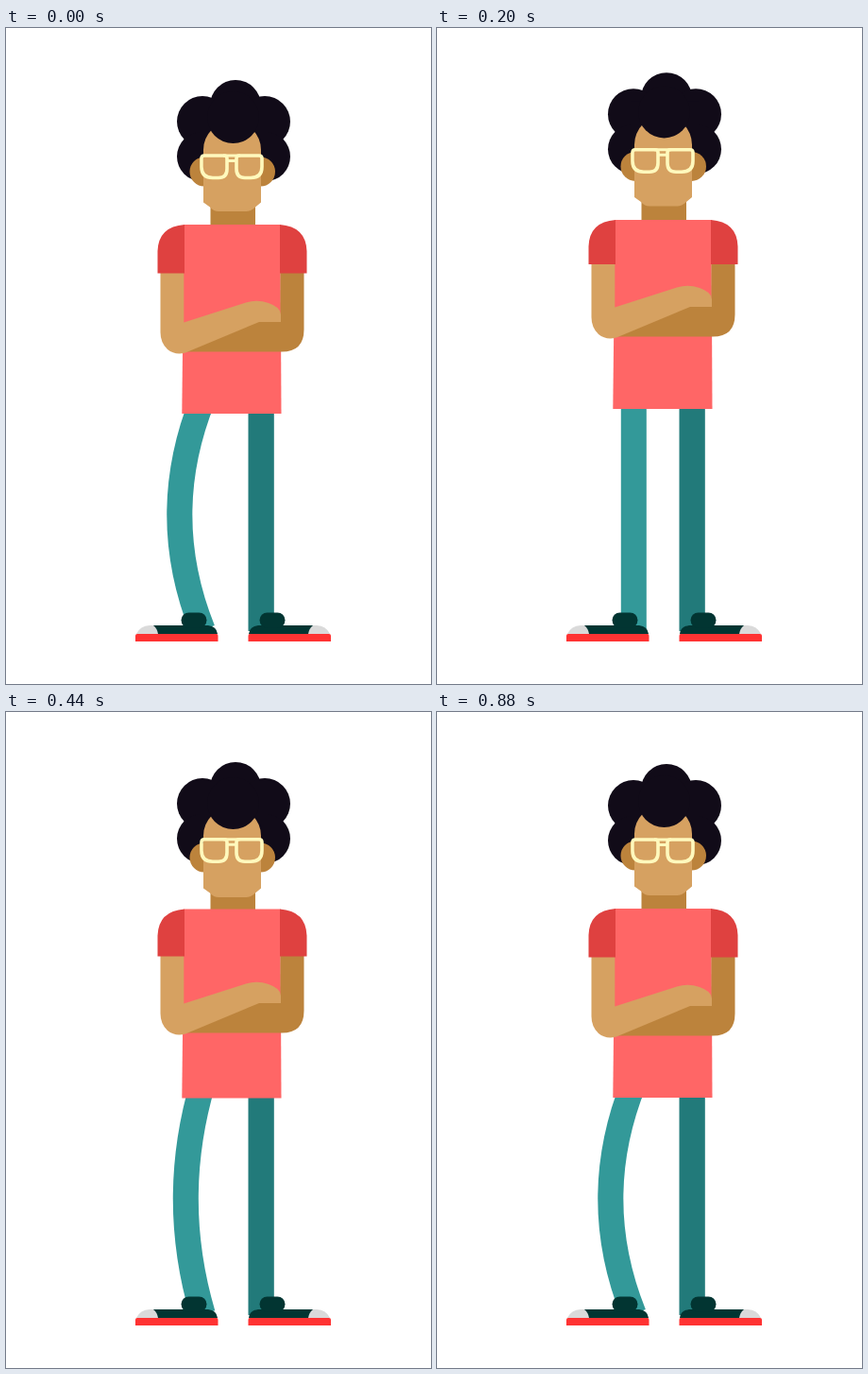
Animation, 450 px wide and 694 px high, one loop 3.84 s. Source, as an HTML page:

```html
<!DOCTYPE html>
<html lang="en">
<head>
<meta charset="utf-8">
<title>Standing figure</title>
<style>
  html, body { margin: 0; width: 100%; height: 100%; overflow: hidden; background: #fff; }
  svg { display: block; width: 100%; height: 100%; }
  .hair { fill: #110b18; }
  .skin { fill: #d6a161; }
  .shade { fill: #bc833c; }
  .shirt { fill: #f66; }
  .sleeve { fill: #df4140; }
  .shoe { fill: #023532; }
  .toe { fill: #dadada; }
  .sole { fill: #f33; }
  .glasses { fill: none; stroke: #fff9bd; stroke-width: 3.6; }
</style>
</head>
<body>
<svg viewBox="0 0 450 694">
  <defs>
    <g id="foot">
      <path class="shoe" d="M155 632H214Q223 633 224 641H155Z"/>
      <rect class="shoe" x="185.500" y="618.500" width="27" height="16" rx="8"/>
      <path class="toe" d="M138 641Q142 632.500 152 632H156Q160 635 161 641Z"/>
      <path class="sole" d="M137 649V643Q137 641 139 641H223Q224.500 641 224.500 643V649Z"/>
    </g>
  </defs>

  <path id="leg" fill="none" stroke="#399" stroke-width="27"/>
  <rect x="256.500" y="395" width="27.300" height="243" fill="#227a7a"/>
  <use href="#foot"/>
  <use href="#foot" transform="translate(481 0) scale(-1 1)"/>

  <g id="hair" class="hair">
    <circle cx="243" cy="82" r="27"/>
    <circle cx="208" cy="99" r="27"/>
    <circle cx="274" cy="99" r="27"/>
    <circle cx="207" cy="136" r="26"/>
    <circle cx="275" cy="136" r="26"/>
    <rect x="205" y="85" width="72" height="50"/>
  </g>

  <g id="face">
    <rect class="shade" x="216.500" y="170" width="47.500" height="50"/>
    <circle class="shade" cx="210" cy="152" r="15.500"/>
    <circle class="shade" cx="269.500" cy="152" r="15.500"/>
    <path class="skin" d="M209 129A30.500 30.500 0 0 1 270 129V184.500L264 189.500Q259 194 254 194H225Q220 194 216 189.500L209 184.500Z"/>
    <circle class="hair" cx="240.500" cy="94.500" r="27.500"/>
  </g>

  <g id="glasses" class="glasses">
    <path id="lens" d="M207 138Q207 135 210 135H231Q234 135 234 138V149Q234 158.500 225 158.500H219Q207 158.500 207 147Z"/>
    <use href="#lens" transform="translate(478 0) scale(-1 1)"/>
    <path d="M230 135H248M234 140.500H244" stroke-width="3"/>
  </g>

  <path id="torso" class="shirt" d="M188.500 208H290.500L291.500 408H186.300Z"/>

  <g id="arms">
    <path class="shade" d="M290.500 250H315.500V319Q315.500 342.500 292 342.500H187L268 309H290.500Z"/>
    <path class="skin" d="M163.500 250H188.300V311.500L254 290.500Q266 287 278 291Q291 295.500 291 303V311H268L190 343.500Q179 346.500 171 340Q163.500 333 163.500 322Z"/>
  </g>
  <path id="sleeves" class="sleeve"/>
</svg>

<script>
  const LOOP = 3840, STEP = 40;
  const times = [0, 120, 200, 280, 440, 560, 720, 880];

  // Offsets from the resting pose; "bend" is the sideways bow of the knee.
  const tracks = {
    hair:    [0, -5, -7.8, -9, -2, 5, 1.7, 0],
    face:    [0, -4, -5.6, -6, 2, 0.4, 0.2, 0],
    glasses: [0, -4.5, -6.3, -7, -0.3, 2.5, 1, 0],
    body:    [0, -5, -5, -5, 0.4, 1.3, 0.4, 0],
    cuff:    [0, -9, -9.5, -9.5, -1, 1, 0.3, 0],
    arms:    [0, -15, -16, -16, -3, 1, 0.3, 0],
    bend:    [24.5, 5.3, 0, 0, 18, 24.5, 24.5, 24.5]
  };

  const $ = id => document.getElementById(id);
  const shift = (id, y) => $(id).setAttribute("transform", `translate(0 ${y})`);

  const rate = (v, i) => (v[i + 1] - v[i]) / (times[i + 1] - times[i]);

  // Slope at a key that never overshoots its neighbours
  function slope(v, i) {
    if (i === 0 || i === times.length - 1) return 0;
    const a = rate(v, i - 1), b = rate(v, i);
    return a * b > 0 ? 2 * a * b / (a + b) : 0;
  }

  function sample(v, t) {
    const last = times.length - 1;
    if (t >= times[last]) return v[last];
    let i = 0;
    while (t >= times[i + 1]) i++;
    const span = times[i + 1] - times[i], u = (t - times[i]) / span;
    // ease out of the resting pose quickly
    const m0 = i === 0 ? rate(v, 0) : slope(v, i), m1 = slope(v, i + 1);
    const w = 1 - u;
    return v[i] * (1 + 2 * u) * w * w + v[i + 1] * u * u * (3 - 2 * u)
         + span * u * w * (m0 * w - m1 * u);
  }

  function draw(t) {
    const p = {};
    for (const k in tracks) p[k] = sample(tracks[k], t);

    shift("hair", p.hair);
    shift("face", p.face);
    shift("glasses", p.glasses);
    shift("torso", p.body);
    shift("arms", p.arms);

    const top = 208 + p.body, cuff = 259.5 + p.cuff, round = top + 28;
    $("sleeves").setAttribute("d",
      `M189 ${top}V${cuff}H160.500V${round}Q161.500 ${top + 2} 189 ${top}Z` +
      `M290 ${top}V${cuff}H318.500V${round}Q317.500 ${top + 2} 290 ${top}Z`);

    $("leg").setAttribute("d", `M208.300 393Q${208.3 - 2 * p.bend} 515 208.300 637`);
  }

  const start = performance.now();
  function tick() {
    const t = (performance.now() - start) % LOOP;
    draw(Math.floor(t / STEP) * STEP);
    requestAnimationFrame(tick);
  }
  tick();
</script>
</body>
</html>
```
